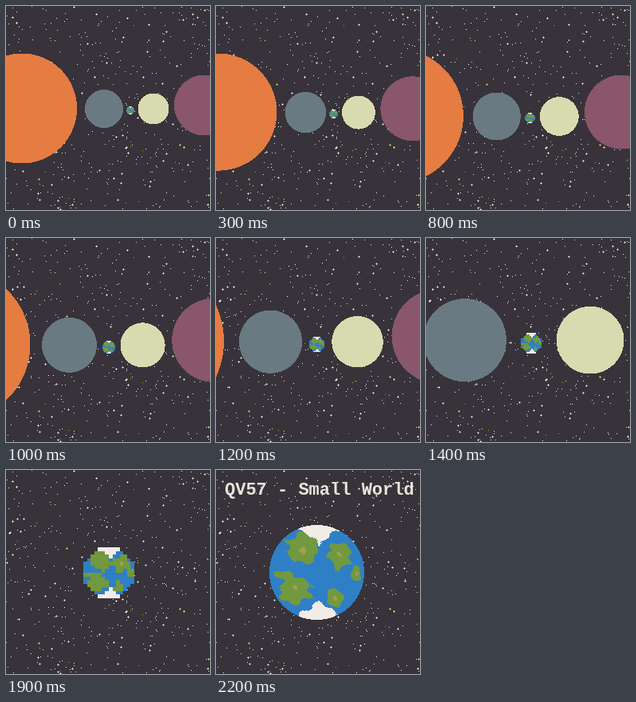
Animation of 256x256 px, one loop 8 s. Source, as an HTML page with a canvas:

```html
<!DOCTYPE html>
<html lang="en">
<head>
<meta charset="utf-8">
<title>Small World</title>
<style>
  html, body { margin: 0; width: 100%; height: 100%; overflow: hidden; background: #38333a; }
  canvas { display: block; width: 100vw; height: 100vh; image-rendering: pixelated; }
</style>
</head>
<body>
<canvas id="stage" width="256" height="256"></canvas>
<script>
const SIZE = 256, LOOP = 8000, STEP = 100, ARRIVAL = 2200;

// Flight path: time, where Earth appears, logarithm of the zoom
const flight = [
  { t: 100, x: 156, y: 131, zoom: 0 },
  { t: 500, x: 139.5, y: 140.5, zoom: 0.14 },
  { t: 800, x: 130.5, y: 141, zoom: 0.223 },
  { t: 1200, x: 126.5, y: 133.5, zoom: 0.5 },
  { t: 1400, x: 132.5, y: 132.5, zoom: 0.775 },
  { t: 1700, x: 130, y: 130, zoom: 1.154 },
  { t: ARRIVAL, x: 126.5, y: 128.5, zoom: 1.98 },
];
// Offset from Earth and radius at the start; pace is the share of the zoom each one follows
const planets = [
  { color: '#e57c42', dx: -136, dy: -2.5, r: 69, pace: 0.9 },
  { color: '#6a7a82', dx: -33, dy: -2, r: 24, pace: 1 },
  { color: '#d8dbaf', dx: 29, dy: -2, r: 19.5, pace: 1 },
  { color: '#89566b', dx: 93, dy: -6.5, r: 38, pace: 0.9 },
];
const earth = { r: 5, pace: 1.25 };
// Continents as ellipses on a unit globe: x, y, half width, half height
const continents = [
  [-0.3, -0.5, 0.34, 0.32], [0.5, -0.36, 0.24, 0.28], [0.84, 0.04, 0.1, 0.16],
  [-0.68, 0.06, 0.2, 0.1], [-0.44, 0.37, 0.32, 0.28], [0.39, 0.52, 0.15, 0.2],
];

function random(seed) {
  return () => (seed = (seed * 16807) % 2147483647) / 2147483647;
}

function makeCanvas(size) {
  const canvas = document.createElement('canvas');
  canvas.width = canvas.height = size;
  return canvas;
}

function makeSky() {
  const canvas = makeCanvas(SIZE), g = canvas.getContext('2d'), rnd = random(2017);
  g.fillStyle = '#38333a';
  g.fillRect(0, 0, SIZE, SIZE);
  for (let i = 0; i < 480; i++) {
    const x = Math.floor(rnd() * SIZE), y = Math.floor(rnd() * SIZE);
    const big = rnd() < 0.12, yellow = rnd() < 0.04;
    g.fillStyle = yellow ? (big ? '#e8e45a' : '#b5ad20') : '#f4f2ee';
    g.fillRect(x, y, 1, 1);
    if (big) {
      g.globalAlpha = 0.6;
      g.fillRect(x - 1, y, 3, 1);
      g.fillRect(x, y - 1, 1, 3);
      g.globalAlpha = 1;
    }
  }
  return canvas;
}

// Globe painted cell by cell, with wavy coasts and ice at both poles
function makeGlobe(cells, grow) {
  const canvas = makeCanvas(cells), g = canvas.getContext('2d'), rnd = random(38);
  for (let row = 0; row < cells; row++)
    for (let col = 0; col < cells; col++) {
      const u = (2 * col + 1) / cells - 1, v = (2 * row + 1) / cells - 1;
      if (Math.hypot(u, v) > 1) continue;
      const rough = 0.13 * (Math.sin(19 * u + 6 * v) + Math.sin(25 * v - 9 * u) + rnd() - 0.5);
      const inland = Math.min(...continents.map(([x, y, w, h]) => Math.hypot((u - x) / w, (v - y) / h)));
      if (Math.abs(v) > 0.6 + 0.75 * Math.abs(u - 0.04) + rough / 4) g.fillStyle = '#f2ece7';
      else if (inland < 0.15 - rough) g.fillStyle = '#a39f52';
      else if (inland < grow + rough) g.fillStyle = '#72993f';
      else g.fillStyle = '#2f7fc6';
      g.fillRect(col, row, 1, 1);
    }
  return canvas;
}

const ctx = document.getElementById('stage').getContext('2d');
const sky = makeSky(), farGlobe = makeGlobe(14, 1.25), nearGlobe = makeGlobe(119, 1);

function cameraAt(t) {
  const i = flight.findIndex(key => key.t > t);
  if (i < 0) return flight[flight.length - 1];
  const a = flight[i - 1], b = flight[i], k = (t - a.t) / (b.t - a.t);
  const mix = name => a[name] + (b[name] - a[name]) * k;
  return { x: mix('x'), y: mix('y'), zoom: mix('zoom') };
}

// Hard-edged disc, one row at a time
function disc(x, y, r, color) {
  ctx.fillStyle = color;
  for (let row = Math.round(y - r); row < y + r; row++) {
    const half = Math.sqrt(Math.max(0, r * r - (row + 0.5 - y) ** 2));
    const left = Math.round(x - half);
    ctx.fillRect(left, row, Math.round(x + half) - left, 1);
  }
}

function draw(time) {
  const t = Math.max(STEP, Math.floor(time / STEP) * STEP);
  const camera = cameraAt(t);
  ctx.drawImage(sky, 0, 0);

  for (const { color, dx, dy, r, pace } of planets) {
    const zoom = camera.zoom * pace, scale = Math.exp(zoom);
    const spread = Math.exp(zoom + 0.26 * zoom * zoom); // distances open faster than sizes grow
    disc(camera.x + dx * spread, camera.y + dy * scale, r * scale, color);
  }

  const r = earth.r * Math.exp(camera.zoom * earth.pace);
  ctx.imageSmoothingEnabled = false;
  ctx.drawImage(t < 2000 ? farGlobe : nearGlobe,
    Math.round(camera.x - r), Math.round(camera.y - r), Math.round(2 * r), Math.round(2 * r));

  if (t >= ARRIVAL) {
    ctx.font = 'bold 22px "Liberation Mono", monospace';
    ctx.fillStyle = '#e9e3da';
    ctx.fillText('QV57 - Small World', 11, 31);
  }
}

function tick() {
  draw(performance.now() % LOOP);
  requestAnimationFrame(tick);
}
tick();
</script>
</body>
</html>
```
